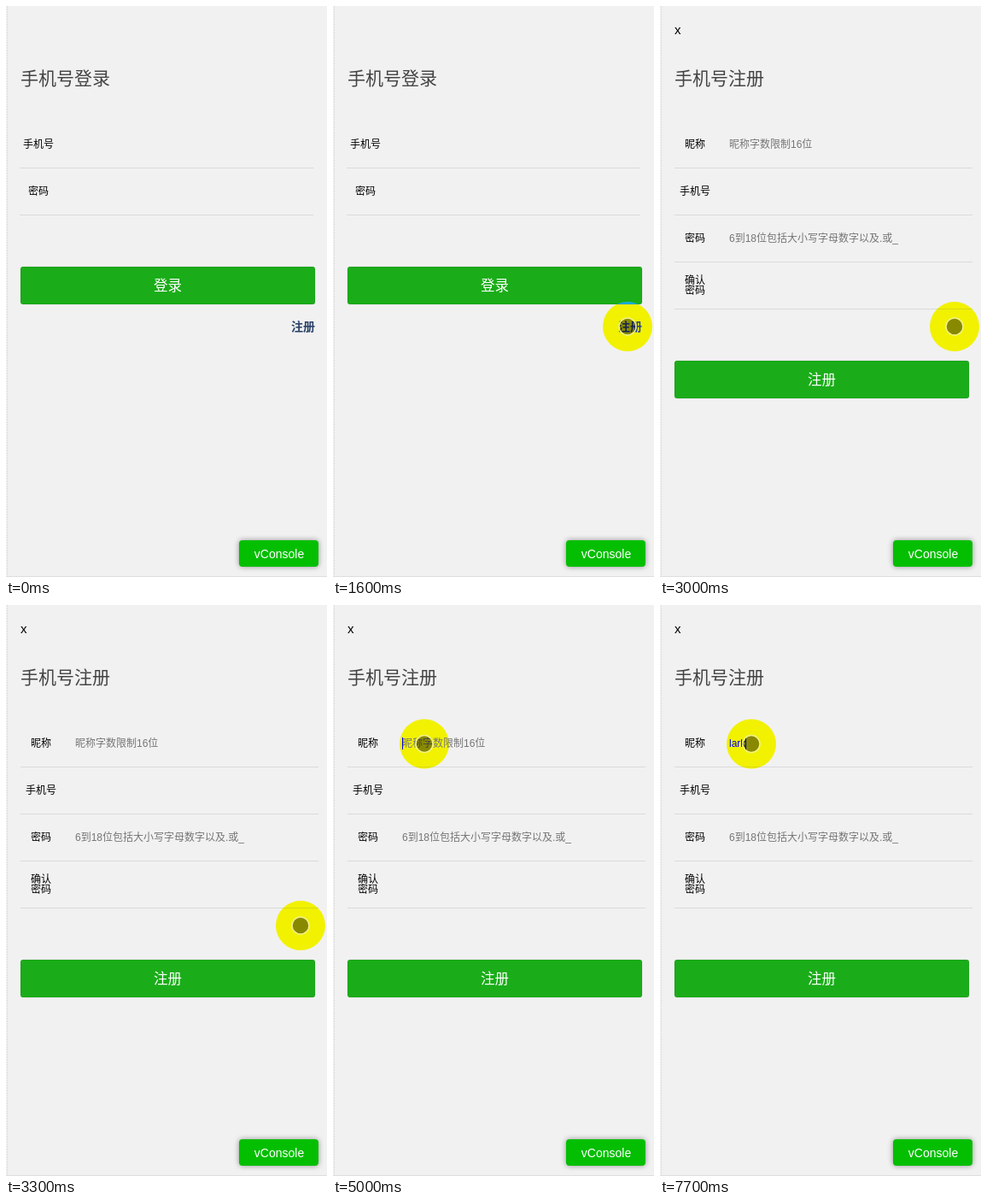
An HTML page for the animation above (8 s loop, 376 px wide and 668 px high).

```html
<!DOCTYPE html>
<html lang="zh-CN">
<head>
<meta charset="utf-8">
<title>Sign up</title>
<style>
  html, body { margin: 0; width: 100%; height: 100%; overflow: hidden; background: #f1f1f1; }
  svg { display: block; width: 376px; height: 668px; isolation: isolate; }
  text { font: 12px "Liberation Sans", Arial, "Noto Sans CJK SC", "Noto Sans CJK", sans-serif; fill: #000; white-space: pre; }
  .bg { fill: #f1f1f1; }
  .title { font-size: 21px; font-weight: 300; fill: #444; }
  .mid { text-anchor: middle; }
  .btn { fill: #1aad19; stroke: rgba(0, 0, 0, .2); stroke-width: .5; }
  .btn-text { font-size: 16.5px; fill: #fff; text-anchor: middle; }
  .link { font-size: 14px; font-weight: bold; fill: #2b4468; text-anchor: end; }
  .hint { fill: #757575; }
  .rule { stroke: #dadada; fill: none; }
  .icon { fill: none; stroke: #3c3c3c; stroke-width: 1.5; stroke-linejoin: round; stroke-linecap: round; }
  .tab { fill: #808080; text-anchor: middle; }
  .console { fill: #04be02; filter: drop-shadow(0 0 3px rgba(0, 0, 0, .4)); }
  #halo { fill: #0000f1; mix-blend-mode: difference; }
  #dot { fill: rgba(0, 0, 0, .43); stroke: #f3f38c; stroke-width: 1.5; }
</style>
</head>
<body>
<svg viewBox="0 0 376 668">
  <clipPath id="screen"><rect x="2" width="374" height="668"/></clipPath>
  <rect class="bg" width="376" height="668"/>

  <g clip-path="url(#screen)">
    <g id="home">
      <rect width="376" height="668" fill="#fff"/>
      <rect width="376" height="45" fill="#393a3f"/>
      <text x="17" y="28" style="font-size:16px;fill:#fff">鹭笺</text>
      <rect class="bg" y="616" width="376" height="52"/>
      <g class="icon">
        <path d="M43 641.5C34 636 38 625 49 625S62 636 54 640.5Q50 642.500 46 641.500L42 643.500Z"/>
        <path d="M133 642Q133 639 140 637Q136 632 137 629Q138 625 142 625T147 629Q148 632 144 637Q151 639 151 642ZM148 630H154M149 634H154M151 638H154"/>
        <circle cx="236" cy="634" r="10"/>
        <path d="M240.500 629.500L238 636L231.500 638.500L234 632Z"/>
      </g>
      <text class="tab" x="49" y="660.500">鹭笺</text>
      <text class="tab" x="142" y="660.500">通讯录</text>
      <text class="tab" x="236" y="660.500">发现</text>
    </g>

    <g id="login">
      <rect class="bg" x="2" width="375" height="668"/>
      <text class="title" x="17" y="92">手机号登录</text>
      <text x="20" y="165.500">手机号</text>
      <text x="26" y="220.500">密码</text>
      <path class="rule" d="M16 189.500H360M16 244.500H360"/>
      <rect class="btn" x="17" y="305" width="345" height="44" rx="3"/>
      <text class="btn-text" x="189.500" y="332.500">登录</text>
      <text class="link" x="362" y="379.500">注册</text>
    </g>

    <g id="signup">
      <rect class="bg" x="2" width="375" height="668"/>
      <text x="17" y="33" style="font-size:15px">x</text>
      <text class="title" x="17" y="92">手机号注册</text>
      <text class="mid" x="41" y="165.500">昵称</text>
      <text class="mid" x="41" y="220.500">手机号</text>
      <text class="mid" x="41" y="275.500">密码</text>
      <text class="mid" x="41" y="325">确认</text>
      <text class="mid" x="41" y="337">密码</text>
      <path class="rule" d="M17 189.500H366M17 244.500H366M17 299.500H366M17 354.500H366"/>
      <text class="hint" id="hint" x="81" y="165.500">昵称字数限制16位</text>
      <text class="hint" x="81" y="275.500">6到18位包括大小写字母数字以及.或_</text>
      <text id="name" x="81" y="165.500"></text>
      <rect id="caret" y="155" width="1" height="14"/>
      <rect class="btn" x="17" y="415" width="345" height="44" rx="3"/>
      <text class="btn-text" x="189.500" y="442.500">注册</text>
    </g>
  </g>

  <path d="M1.500 0V668" stroke="#dcdcdc" stroke-dasharray="2 1"/>
  <path d="M0 667.500H376" stroke="#dfdfdf"/>
  <rect class="console" x="273" y="625" width="93" height="31" rx="4"/>
  <text class="mid" x="320" y="646" style="font-size:14px;fill:#fff">vConsole</text>
  <circle id="halo" r="29"/>
  <circle id="dot" r="10"/>
</svg>

<script>
const LOOP = 8000, STEP = 100;
const NAME = "lark";
const KEYS = [5900, 6100, 6300, 6500];
const FOCUS = 4000, BLINK = 500;

// Pointer moves: start, end, from [x, y], to [x, y], easing
const easeOut = p => 1 - (1 - p) ** 2;
const easeInOut = p => p * p * (3 - 2 * p);
const MOVES = [
  [300, 800, [412, 385], [345, 375], easeOut],
  [3300, 3700, [345, 375], [107, 162.5], easeInOut]
];

const $ = id => document.getElementById(id);
const [home, login, signup, hint, name, caret, halo, dot] =
  ["home", "login", "signup", "hint", "name", "caret", "halo", "dot"].map($);

const progress = (t, a, b) => Math.min(1, Math.max(0, (t - a) / (b - a)));
const show = (el, on) => el.setAttribute("visibility", on ? "visible" : "hidden");
const shift = (el, x) => el.setAttribute("transform", `translate(${x} 0)`);

function drawPages(t) {
  const p = progress(t, 2490, 2992);
  const slide = p < .5 ? 2 * p * p : 1 - 2 * (1 - p) ** 2;
  shift(login, -375 * slide);
  login.setAttribute("opacity", Math.max(0, 1 - 1.4 * slide));
  shift(signup, 375 * (1 - slide));
  show(home, p > 0 && p < 1);
}

function drawField(t) {
  const typed = KEYS.filter(k => k <= t);
  const since = t - (typed.at(-1) ?? FOCUS);
  name.textContent = NAME.slice(0, typed.length);
  show(hint, !typed.length);
  show(caret, since >= 0 && Math.floor(since / BLINK) % 2 === 0);
  const width = typed.length ? name.getComputedTextLength() : 0;
  caret.setAttribute("x", Math.round(81 + width));
}

function drawPointer(t) {
  const [start, end, from, to, ease] = MOVES.findLast(m => t >= m[0]) || MOVES[0];
  const p = ease(progress(t, start, end));
  const [x, y] = from.map((v, i) => v + (to[i] - v) * p);
  for (const c of [halo, dot]) {
    c.setAttribute("cx", x);
    c.setAttribute("cy", y);
    show(c, t >= 400);
  }
}

const origin = performance.now();
function frame() {
  const now = (performance.now() - origin) % LOOP;
  const t = Math.floor(now / STEP) * STEP;
  drawPages(t);
  drawField(t);
  drawPointer(t);
  requestAnimationFrame(frame);
}
frame();
</script>
</body>
</html>
```
